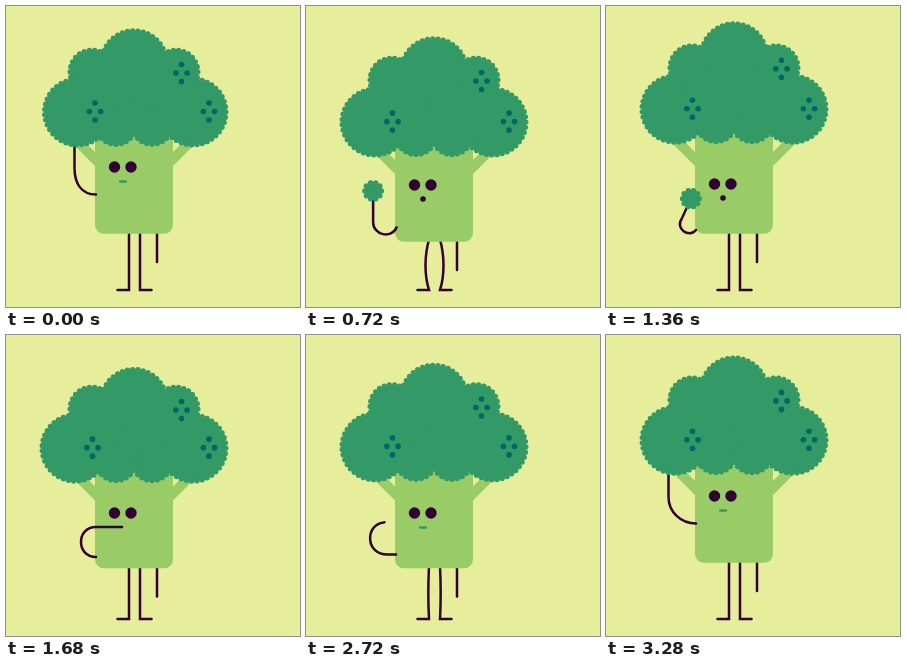
An HTML page with a canvas for the animation above (3.36 s loop, 294 by 301 pixels).

```html
<!DOCTYPE html>
<html lang="en">
<head>
<meta charset="utf-8">
<title>Hungry broccoli</title>
<style>
  html, body { margin: 0; width: 100%; height: 100%; overflow: hidden; background: #e6ed9b; }
  canvas { display: block; width: 294px; height: 301px; }
</style>
</head>
<body>
<canvas id="stage"></canvas>
<script>
const LOOP = 3360, STEP = 80, TAU = 2 * Math.PI;
const BG = '#e6ed9b', LEAF = '#339966', STEM = '#99cc66', INK = '#330033', SPOT = '#006666';
const canvas = document.getElementById('stage');
const ctx = canvas.getContext('2d');
const dpr = window.devicePixelRatio || 1;
canvas.width = Math.round(294 * dpr);
canvas.height = Math.round(301 * dpr);

// Timing helpers
const mix = (a, b, k) => a + (b - a) * k;
const part = (t, from, to) => Math.min(1, Math.max(0, (t - from) / (to - from)));
function ramp(t, from, to) {
  const k = part(t, from, to);
  return k * k * (3 - 2 * k);
}
const bump = (t, from, to) => Math.sin(Math.PI * part(t, from, to)) ** 2;
function wobble(t, from, to) {
  const k = part(t, from, to);
  return (1 - k) * Math.sin(TAU * k);
}

// Arm poses: hand, elbow, two curve handles, shoulder
const grab = [62.5, 125, 62.5, 162, 62.5, 177, 75, 188.5, 90, 188.5];
const pluck = [65.5, 170, 65.5, 201, 65.5, 213, 78, 222, 91, 215.5];
const lower = [68, 193, 68, 224, 68, 238.7, 90, 238.7, 90, 225];
const eat = [116, 192, 90, 192, 70, 192, 70, 222, 90, 222];
const rest = [80, 192, 79, 192, 59, 192, 59, 222.5, 80, 222.5];
const reach = [70, 162, 70, 163, 59, 176, 59, 204, 90, 204];
const moves = [[400, 480, pluck], [480, 880, lower], [1200, 1600, eat],
  [1720, 2000, rest], [2640, 2960, reach], [2960, 3120, grab]];

// Everything that moves at time t
function poseAt(t) {
  const down = ramp(t, 400, 480) - ramp(t, 2800, 3120);
  const crouch = ramp(t, 400, 480) - ramp(t, 1000, 1360);
  const stretch = bump(t, 1120, 1600);
  const body = 5.5 * down + 2.5 * crouch - 5.5 * stretch;
  const lag = 3.5 * wobble(t, 1040, 1520) + 6 * wobble(t, 1520, 2080)
    + 16.5 * wobble(t, 2800, 3360) - 6 * stretch;
  const bow = (5 * ramp(t, 400, 480) - 3 * ramp(t, 480, 960)) * (1 - ramp(t, 1100, 1280))
    + 2.5 * bump(t, 2640, 3120);
  const tug = 2.5 * (1 - ramp(t, 0, 240));
  const arm = moves.reduce((pose, [from, to, next]) =>
    pose.map((v, i) => mix(v, next[i], ramp(t, from, to))), grab);
  for (const i of [0, 2, 4]) arm[i] += 2.4 * tug;
  return {
    body, bow, tug, arm,
    face: 17 * (ramp(t, 400, 500) - ramp(t, 2800, 3200)) + crouch * ramp(t, 480, 560),
    tip: body + lag,
    mid: body + 0.6 * lag,
    low: body + 0.4 * lag + 0.6 * bow
  };
}

function disc(x, y, r, color) {
  ctx.fillStyle = color;
  ctx.beginPath();
  ctx.arc(x, y, r, 0, TAU);
  ctx.fill();
}

// Disc with a scalloped rim
function floret(x, y, r) {
  const knob = 2.7, rim = r - knob, n = Math.round(TAU * rim / (knob * 1.95));
  disc(x, y, rim, LEAF);
  for (let i = 0; i < n; i++) {
    const a = i / n * TAU;
    disc(x + rim * Math.cos(a), y + rim * Math.sin(a), knob, LEAF);
  }
}

function spots(x, y) {
  for (const s of [-1, 1]) {
    disc(x, y + 8.5 * s, 2.8, SPOT);
    disc(x + 5.6 * s, y, 2.8, SPOT);
  }
}

function polygon(points, color) {
  ctx.fillStyle = color;
  ctx.beginPath();
  points.forEach(([x, y]) => ctx.lineTo(x, y));
  ctx.fill();
}

function pill(x, y, w, h, radii, color) {
  ctx.fillStyle = color;
  ctx.beginPath();
  ctx.roundRect(x, y, w, h, radii);
  ctx.fill();
}

function line(color, trace) {
  ctx.strokeStyle = color;
  ctx.beginPath();
  trace();
  ctx.stroke();
}

function drawLegs({ body, bow }) {
  const hip = 227.5 + body, ground = 284;
  for (const side of [-1, 1]) {
    const x = 128.5 + 5.5 * side, knee = x + side * bow * 4 / 3;
    line(INK, () => {
      ctx.moveTo(x, hip - 2);
      ctx.bezierCurveTo(knee, mix(hip, ground, 0.3), knee, mix(hip, ground, 0.7), x, ground);
      ctx.lineTo(x + 11.5 * side, ground);
    });
  }
  line(INK, () => {
    ctx.moveTo(151, hip - 2);
    ctx.lineTo(151, hip + 28.5);
  });
}

function drawStem({ body }) {
  const branch = [[60, 131], [74, 131], [92, 149], [92, 163]].map(([x, y]) => [x, y + body]);
  polygon(branch, STEM);
  polygon(branch.map(([x, y]) => [256 - x, y]), STEM);
  pill(89, 120 + body, 78, 107.8, [0, 0, 9, 9], STEM);
}

function drawFace(t, { face }) {
  disc(108.5, 161 + face, 5.7, INK);
  disc(125, 161 + face, 5.7, INK);
  if (t < 480 || t >= 2720) {
    line(LEAF, () => {
      ctx.moveTo(114.2, 175.5 + face);
      ctx.lineTo(119.8, 175.5 + face);
    });
  } else if (t < 1600) {
    disc(117, 175 + face, 2.8, INK);
  } else if (t >= 1760) {
    const chew = Math.sin((t - 2320) / 320 * Math.PI) ** 2;
    pill(111 + chew, 174 + face + 3 * chew, 14.5 - 2 * chew, 8 + chew, 4, INK);
  }
}

function drawArm(t, { arm }) {
  const [hx, hy, ex, ey, ...curve] = arm;
  line(INK, () => {
    ctx.moveTo(hx, hy);
    ctx.lineTo(ex, ey);
    ctx.bezierCurveTo(...curve);
    ctx.lineTo(90, curve[5]);
  });
  if (t >= 480 && t < 1600) floret(hx, hy, 11);
}

function drawCrown({ tip, mid, low, tug }) {
  const lobes = [[69 + tug, 106 + low, 35.5], [86, 66 + mid, 24.5], [128, 57.5 + tip, 35.3],
    [170, 66 + mid, 24.5], [187, 106 + low, 35.5], [146, 118 + low, 23], [110, 118 + low, 23]];
  polygon(lobes, LEAF);
  lobes.forEach(lobe => floret(...lobe));
  spots(175.5, 67 + mid);
  spots(86.5 + tug, 105.5 + low);
  spots(203, 105.5 + low);
}

function draw(t) {
  const pose = poseAt(t);
  ctx.setTransform(dpr, 0, 0, dpr, 0, 0);
  ctx.fillStyle = BG;
  ctx.fillRect(0, 0, 294, 301);
  ctx.lineWidth = 2.5;
  ctx.lineCap = 'round';
  drawLegs(pose);
  drawStem(pose);
  drawFace(t, pose);
  drawArm(t, pose);
  drawCrown(pose);
}

const start = performance.now();
function tick() {
  const t = (performance.now() - start) % LOOP;
  draw(Math.floor(t / STEP) * STEP);
  requestAnimationFrame(tick);
}
tick();
</script>
</body>
</html>
```
